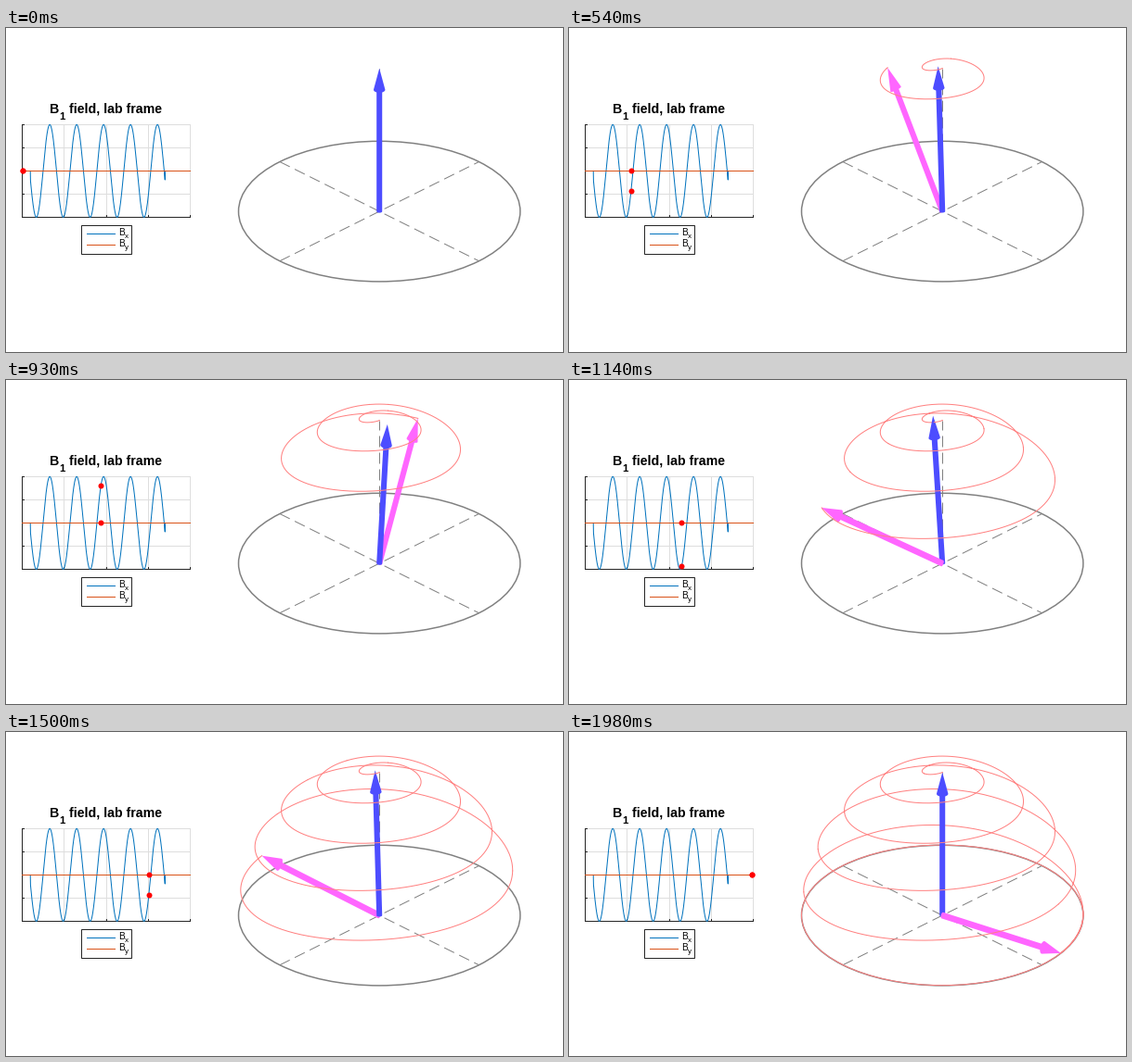
These frames come from a looping animation (600 px wide and 350 px high, 2010 ms). A matplotlib script:

```python
import numpy as np
import matplotlib.pyplot as plt
from matplotlib.animation import FuncAnimation
from matplotlib.patches import Ellipse, Polygon, Rectangle

W, H, DPI = 600, 350, 100
FRAMES, SUB = 67, 20
PX = 72 / DPI

BLUE, ORANGE = (0, 114 / 255, 189 / 255), (217 / 255, 83 / 255, 25 / 255)
GRAY, DARK, GRID = (0.5,) * 3, (0.15,) * 3, (0.87,) * 3
FIELD, SPIN, TRAIL = (0.3, 0.3, 1), (1, 0.4, 1), (1, 0.5, 0.5)

# Plot box and pulse timing, in pixels along the time axis
LEFT, RIGHT, TOP, BOTTOM = 17, 198, 104, 204
MID, AMP = 154.4, 50
T0, T1 = 17.9, 197.4
PERIOD, ZERO = 29.0, 25.4
ON, OFF = 26.3, 171.3
LEAD = 0.85  # the spin runs slightly ahead of the plotted marker

# 3D view
CX, CY, RX, RY, RZ = 402.2, 198.1, 151.7, 75.8, 154.5
B1 = 0.1


def pulse(t):
    t = np.asarray(t, float)
    wave = -np.sin(2 * np.pi * (t - ZERO) / PERIOD)
    return np.where((t >= ON) & (t <= OFF), wave, 0.0)


def field(t):
    return np.array([B1 * float(pulse(t)), 0, 1])


def rotate(m, axis, angle):
    k = axis / np.linalg.norm(axis)
    c, s = np.cos(angle), np.sin(angle)
    return m * c + np.cross(k, m) * s + k * (k @ m) * (1 - c)


def precess():
    """Integrate dM/dt = w M x B over the whole time axis."""
    n = (FRAMES - 1) * SUB
    t = np.linspace(T0, T1, n + 1) + LEAD
    dt = t[1] - t[0]
    path = [np.array([0.0, 0.0, 1.0])]
    for k in range(n):
        b = field(t[k] + dt / 2)
        step = -2 * np.pi / PERIOD * np.linalg.norm(b) * dt
        path.append(rotate(path[-1], b, step))
    return np.array(path)


def depth(p):
    p = np.asarray(p)
    return (p[..., 0] - p[..., 1]) / np.sqrt(2)


def project(p):
    p = np.asarray(p)
    u = (p[..., 0] + p[..., 1]) / np.sqrt(2)
    return np.stack([CX + RX * u, CY + RY * depth(p) - RZ * p[..., 2]], axis=-1)


def hull(points):
    pts = sorted(map(tuple, points))

    def half(seq):
        out = []
        for p in seq:
            while len(out) > 1:
                (ax, ay), (bx, by) = out[-2:]
                if (bx - ax) * (p[1] - ay) - (by - ay) * (p[0] - ax) > 0:
                    break
                out.pop()
            out.append(p)
        return out[:-1]

    return np.array(half(pts) + half(pts[::-1]))


def ring(vec, at, radius):
    e1 = np.cross(vec, np.eye(3)[np.argmin(np.abs(vec))])
    e1 /= np.linalg.norm(e1)
    e2 = np.cross(vec, e1) / np.linalg.norm(vec)
    a = np.linspace(0, 2 * np.pi, 28, endpoint=False)[:, None]
    return project(vec * at + radius * (np.cos(a) * e1 + np.sin(a) * e2))


class Arrow:
    def __init__(self, color):
        self.parts = [Polygon([(0, 0)] * 3, fc=color, ec="none") for _ in range(2)]
        for part in self.parts:
            ax.add_patch(part)

    def point(self, vec, z):
        neck = 0.85
        shaft = np.vstack([ring(vec, 0, 0.02), ring(vec, neck, 0.02)])
        head = np.vstack([ring(vec, neck, 0.041), project(vec)[None]])
        for part, shape in zip(self.parts, (shaft, head)):
            part.set_xy(hull(shape))
            part.set_zorder(z)

    def show(self, on):
        for part in self.parts:
            part.set_visible(on)


def line(x, y, color, width=1.0, z=1, **kw):
    return ax.plot(x, y, color=color, lw=width * PX, zorder=z, **kw)[0]


def text(x, y, s, px, weight="normal"):
    ax.text(x, y, s, fontsize=px * PX, family="Liberation Sans", weight=weight,
            color="black", ha="left", va="baseline", zorder=9)


fig = plt.figure(figsize=(W / DPI, H / DPI), dpi=DPI, facecolor="white")
ax = fig.add_axes([0, 0, 1, 1])
ax.set_xlim(0, W)
ax.set_ylim(H, 0)
ax.axis("off")

# Field plot
xs = np.linspace(LEFT, RIGHT, 5).round()
ys = np.linspace(TOP, BOTTOM, 5)
for x in xs[1:]:
    line([x, x], [TOP, BOTTOM], GRID, z=0)
for y in ys[:-1]:
    line([LEFT, RIGHT], [y, y], GRID, z=0)
line([LEFT, LEFT], [TOP, BOTTOM], DARK)
line([LEFT, RIGHT], [BOTTOM, BOTTOM], DARK)
for x in xs:
    line([x, x], [BOTTOM - 2, BOTTOM], DARK)
for y in ys:
    line([LEFT, LEFT + 2], [y, y], DARK)

ts = np.linspace(ON - 0.1, OFF + 0.1, 1400)
line(ts, MID - AMP * pulse(ts), BLUE, z=2)
line([LEFT, RIGHT], [MID, MID], ORANGE, z=3)
dots = ax.plot([], [], "o", ms=6 * PX, mfc="red", mec="none", zorder=8)[0]

text(47.3, 92, "B", 14.1, "bold")
text(57.7, 98.7, "1", 11.3, "bold")
text(68, 92, "field, lab frame", 14.1, "bold")

# Legend
ax.add_patch(Rectangle((81, 213), 54, 31, fc="white", ec=DARK, lw=PX))
for y, sub, color in ((222, "x", BLUE), (234, "y", ORANGE)):
    line([87, 116.5], [y, y], color, z=2)
    text(120.7, y + 2, "B", 10)
    text(127.5, y + 5, sub, 8)

# Transverse plane and axes
ax.add_patch(Ellipse((CX, CY), 2 * RX, 2 * RY, fill=False, ec=GRAY,
                     lw=1.5 * PX, zorder=1))
for a, b, z in (([-1, 0, 0], [1, 0, 0], 1), ([0, -1, 0], [0, 1, 0], 1),
                ([0, 0, 0], [0, 0, 1], 4)):
    ends = project([a, b])
    line(ends[:, 0], ends[:, 1], GRAY, z=z, dashes=(12, 6), dash_capstyle="butt")

path = precess()
track = project(path)
track_depth = depth(path)
trail_back = line([], [], TRAIL, z=2)
trail_front = line([], [], TRAIL, z=7)
spin, blue = Arrow(SPIN), Arrow(FIELD)


def in_front(n, m):
    """Mask of trail points nearer to the viewer than the arrows."""
    tip = project(m) - (CX, CY)
    rel = track[:n] - (CX, CY)
    frac = np.clip(rel @ tip / (tip @ tip), 0, 1)
    near_axis = np.abs(rel[:, 0]) < 9
    return track_depth[:n] > np.where(near_axis, 0, depth(m) * frac)


def set_masked(trail, mask):
    shown = np.where(mask[:, None], track[:len(mask)], np.nan)
    trail.set_data(shown[:, 0], shown[:, 1])


def update(i):
    t = T0 + (T1 - T0) * i / (FRAMES - 1)
    n = i * SUB + 1
    m, b = path[n - 1], field(t)

    dots.set_data([t, t], [MID, MID - AMP * float(pulse(t))])

    front = in_front(n, m)
    back = ~front
    back[1:] |= ~front[:-1]  # overlap by one point so the halves join
    back[:-1] |= ~front[1:]
    set_masked(trail_front, front)
    set_masked(trail_back, back)

    blue.point(b, 5)
    spin.point(m, 6 if depth(m) > depth(b) + 1e-9 else 3)
    spin.show(m[2] < 1 - 1e-9)
    return []


anim = FuncAnimation(fig, update, frames=FRAMES, interval=30,
                     init_func=lambda: update(0), repeat=True, repeat_delay=0)
plt.show()
```
